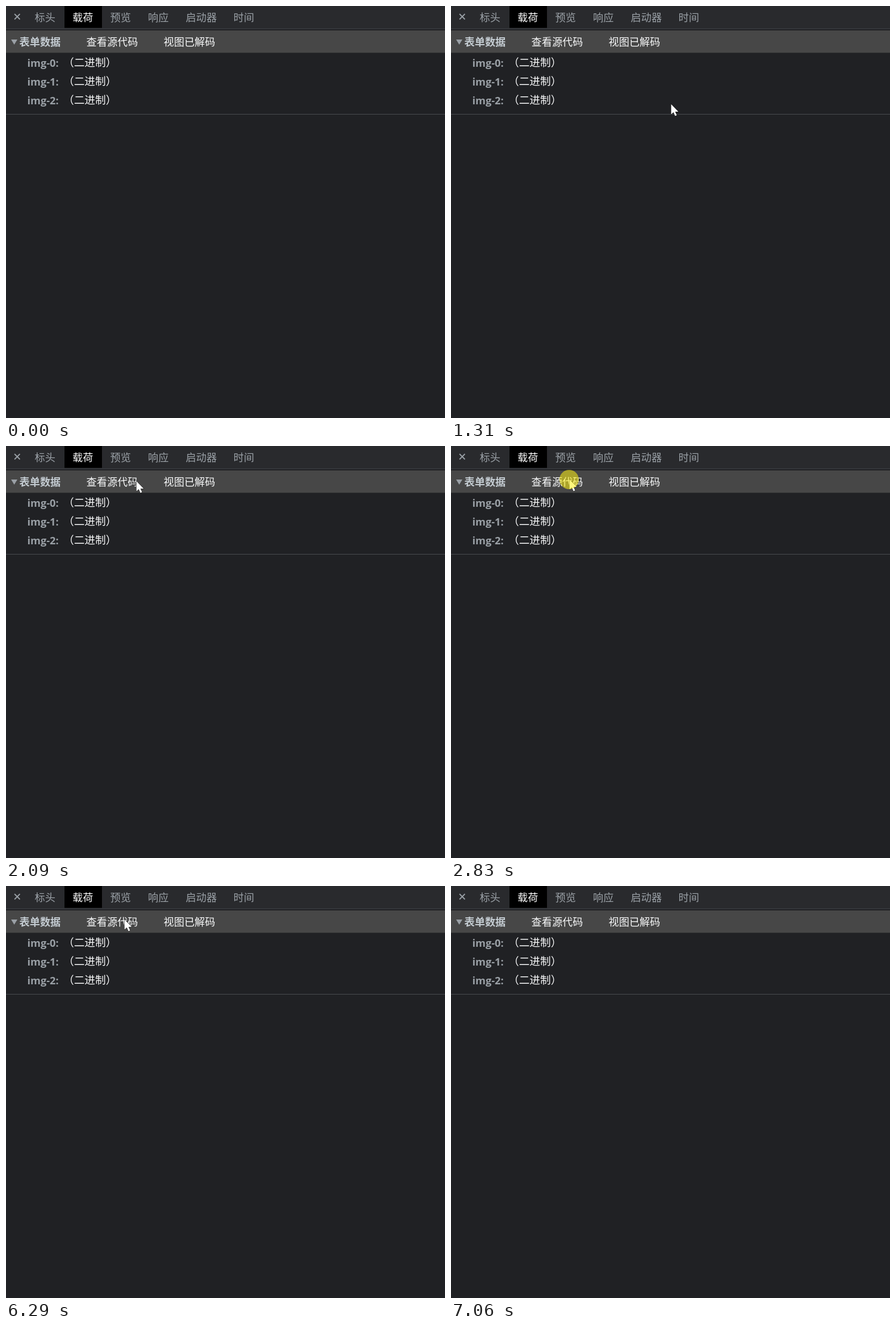
An HTML page for the animation above (8070 ms loop, 773 by 725 pixels).

```html
<!DOCTYPE html>
<html lang="zh-CN">
<head>
<meta charset="utf-8">
<title>表单数据</title>
<style>
  html, body { margin: 0; width: 100%; height: 100%; overflow: hidden; background: #202124; }
  svg { display: block; width: 100%; height: 100%; }
  text { font: 18.2px "Noto Sans CJK SC", "Noto Sans CJK", sans-serif; fill: #f8f9fa; white-space: pre; }
  .tab { fill: #9aa0a6; }
  .on { fill: #fff; }
  .title { font-weight: 700; fill: #c3cbd1; }
  .key { font: 700 18.2px "Open Sans", "Noto Sans", sans-serif; fill: #9aa0a6; }
  .value { font-size: 18.7px; font-weight: 300; }
  .code { font: 500 16.64px "Noto Sans Mono", "DejaVu Sans Mono", monospace; fill: #fff; }
  .rule { fill: #494c50; }
</style>
</head>
<body>
<svg viewBox="0 0 773 725">
  <rect width="773" height="725" fill="#202124"/>
  <rect width="773" height="39" fill="#292a2d"/>
  <rect class="rule" y="39.5" width="773" height="1"/>
  <rect x="103" width="66" height="38.5"/>
  <path d="M15 14l9.5 9.5m0-9.5l-9.5 9.5" stroke="#9aa0a6" stroke-width="1.8" fill="none"/>
  <g id="tabs"></g>
  <rect y="43" width="773" height="39.3" fill="#474747"/>
  <path d="M9 59h11l-5.5 9z" fill="#9aa0a6"/>
  <text class="title" x="23.5" y="70">表单数据</text>
  <g id="parsed"><rect class="rule" y="190" width="773" height="1"/></g>
  <g id="source"><rect class="rule" y="576" width="773" height="1"/></g>
  <path id="cursor" d="M.6 .8V18.8L4.7 15 7.6 21.4 10.6 20.2 7.8 13.9H13.4Z" fill="#fff" stroke="#000" stroke-width=".9" paint-order="stroke"/>
  <circle id="click" cx="208" cy="59" r="17" fill="#fff014" fill-opacity=".55"/>
</svg>
<script>
const LOOP = 8070, STEP = 40;
const $ = id => document.getElementById(id);

function addText(parent, x, y, str, cls = '') {
  const el = document.createElementNS('http://www.w3.org/2000/svg', 'text');
  el.setAttribute('x', x);
  el.setAttribute('y', y);
  el.setAttribute('class', cls);
  el.textContent = str;
  parent.append(el);
}

const tabs = $('tabs'), parsed = $('parsed'), source = $('source');
const cursor = $('cursor'), click = $('click');

[['标头', 50.5], ['载荷', 117], ['预览', 183.5], ['响应', 250], ['启动器', 316.5], ['时间', 400.5]]
  .forEach(([name, x]) => addText(tabs, x, 26.5, name, name === '载荷' ? 'on' : 'tab'));

addText(parsed, 141.5, 70, '查看源代码');
addText(parsed, 277.5, 70, '视图已解码');
for (let i = 0; i < 3; i++) {
  addText(parsed, 37.5, 106.5 + i * 33, `img-${i}:`, 'key');
  addText(parsed, 101, 106 + i * 33, '（二进制）', 'value');
}

addText(source, 141.5, 70, '查看已解析的结果');
const boundary = '------WebKitFormBoundaryCq2OETWGS46YnpjS';
const codeLine = (row, str) => addText(source, 37.5, 106 + row * 30.2, str, 'code');
[['vandrello.jpg', 'jpeg'], ['Surface.jpg', 'jpeg'], ['Y.png', 'png']].forEach(([file, type], i) => {
  codeLine(i * 5, boundary);
  codeLine(i * 5 + 1, `Content-Disposition: form-data; name="img-${i}"; filename="${file}"`);
  codeLine(i * 5 + 2, `Content-Type: image/${type}`);
});
codeLine(15, boundary + '--');

const clamp = u => Math.max(0, Math.min(1, u));
const mix = (a, b, u) => a + (b - a) * u;
const easeOut = (u, k) => 1 - (1 - clamp(u)) ** k;

// Pointer moves: start, end, from, to, easing per axis
const moves = [
  { t0: 1070, t1: 1390, from: [484, 41], to: [377, 172], ex: u => easeOut(u, 1.7), ey: u => easeOut(u / .75, 2) },
  { t0: 1600, t1: 2140, from: [377, 172], to: [208, 55], ex: u => easeOut(u, .96), ey: u => easeOut(u, 1.36) },
  { t0: 2430, t1: 2550, from: [208, 55], to: [208, 58], ex: u => u, ey: u => u },
  { t0: 6610, t1: 7020, from: [208, 58], to: [622, -8], ex: u => u ** 1.4, ey: u => u ** 1.4 }
];

function pointer(t) {
  const m = moves.findLast(m => t >= m.t0);
  if (!m || t >= 7060) return null;
  const held = t >= m.t1 ? m.t1 : m.t0 + Math.floor((t - m.t0) / STEP) * STEP;
  const u = clamp((held - m.t0) / (m.t1 - m.t0));
  return [mix(m.from[0], m.to[0], m.ex(u)), mix(m.from[1], m.to[1], m.ey(u))].map(Math.round);
}

const show = (el, on) => el.setAttribute('visibility', on ? 'visible' : 'hidden');

function draw(t) {
  const raw = t >= 2960 && t < 6290;
  show(source, raw);
  show(parsed, !raw);
  show(click, t >= 2830 && t < 2960);
  const at = pointer(t);
  show(cursor, at);
  if (at) cursor.setAttribute('transform', `translate(${at})`);
}

const start = performance.now();
function tick() {
  draw((performance.now() - start) % LOOP);
  requestAnimationFrame(tick);
}
tick();
</script>
</body>
</html>
```
